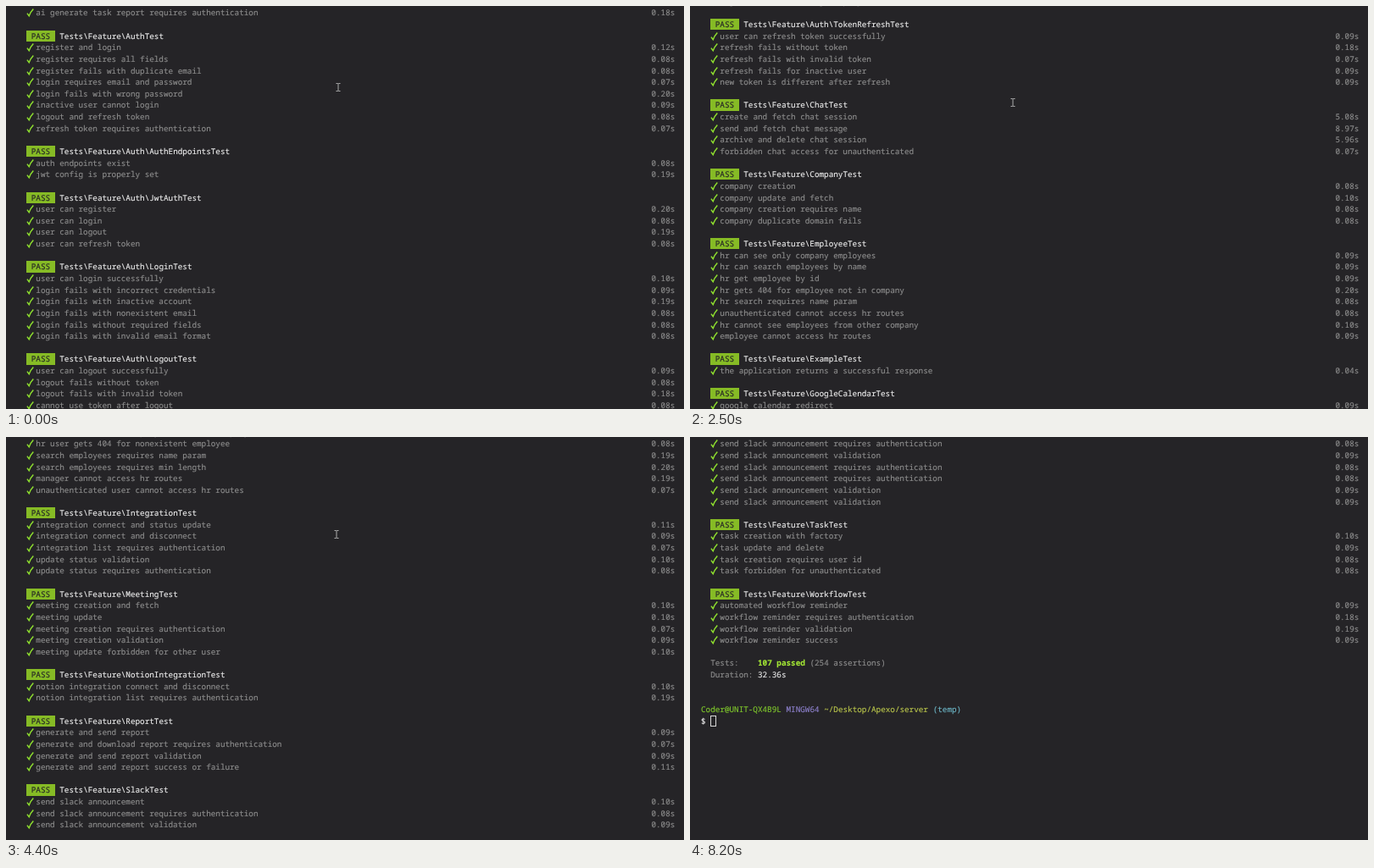
An HTML page for the animation above (8.3 s loop, 800 by 476 pixels).

```html
<!DOCTYPE html>
<html lang="en">
<head>
<meta charset="utf-8">
<title>Test run</title>
<style>
  html, body { margin: 0; width: 100%; height: 100%; overflow: hidden; background: #252427; }
  #term {
    position: relative; width: 800px; height: 476px; overflow: hidden;
    font: 9.3083px/13.635px "Noto Sans Mono", monospace;
    text-rendering: geometricPrecision; font-variant-ligatures: none;
    -webkit-text-stroke: .15px currentColor;
    color: #8c8c8c; white-space: pre;
  }
  .row { position: absolute; left: 13px; width: 776.3px; height: 13.635px; }
  .row span { position: absolute; top: 0; }
  .time { right: 0; }
  .pass { height: 13.2px; background: #86bb25; color: #252427; }
  .check { position: absolute; left: 11px; top: 1px; width: 9px; height: 12px; }
  .check path { fill: none; stroke: #8fe02f; stroke-width: 1.5; }
  .white { color: #ececec; }
  .bold { color: #a3e635; font-weight: 700; }
  .user { color: #7fc62c; }
  .sys { color: #8d80cc; }
  .path { color: #b9c54b; }
  .branch { color: #6cb4c4; }
  .caret { width: 4.4px; height: 11.6px; border: 1px solid #d8d8d8; }
  #mouse { position: absolute; left: 0; top: 0; width: 8px; height: 12px; }
</style>
</head>
<body>
<div id="term"></div>
<script>
const LOOP = 8300, TICK = 100, LINE = 13.635, COL = 5.585, TOP = 1.35;

// "#Name" opens a suite, "0.00 name" is a test, "a" and "v" are repeated redraws
const log = `0.18 ai generate task report requires authentication

#AuthTest
0.12 register and login
0.08 register requires all fields
0.08 register fails with duplicate email
0.07 login requires email and password
0.20 login fails with wrong password
0.09 inactive user cannot login
0.08 logout and refresh token
0.07 refresh token requires authentication

#Auth/AuthEndpointsTest
0.08 auth endpoints exist
0.19 jwt config is properly set

#Auth/JwtAuthTest
0.20 user can register
0.08 user can login
0.19 user can logout
0.08 user can refresh token

#Auth/LoginTest
0.10 user can login successfully
0.09 login fails with incorrect credentials
0.19 login fails with inactive account
0.08 login fails with nonexistent email
0.08 login fails without required fields
0.08 login fails with invalid email format

#Auth/LogoutTest
0.09 user can logout successfully
0.08 logout fails without token
0.18 logout fails with invalid token
0.08 cannot use token after logout

#Auth/RegisterTest
0.09 user can register successfully
0.19 register fails with existing email
0.08 register fails with invalid role
0.07 register fails without required fields
0.18 register fails with password mismatch
0.19 register fails with short password
0.10 can register with optional fields
0.19 register with existing company

#Auth/TokenRefreshTest
0.09 user can refresh token successfully
0.18 refresh fails without token
0.07 refresh fails with invalid token
0.09 refresh fails for inactive user
0.09 new token is different after refresh

#ChatTest
5.08 create and fetch chat session
8.97 send and fetch chat message
5.96 archive and delete chat session
0.07 forbidden chat access for unauthenticated

#CompanyTest
0.08 company creation
0.10 company update and fetch
0.08 company creation requires name
0.08 company duplicate domain fails

#EmployeeTest
0.09 hr can see only company employees
0.09 hr can search employees by name
0.09 hr get employee by id
0.20 hr gets 404 for employee not in company
0.08 hr search requires name param
0.08 unauthenticated cannot access hr routes
0.10 hr cannot see employees from other company
0.09 employee cannot access hr routes

#ExampleTest
0.04 the application returns a successful response

#GoogleCalendarTest
0.09 google calendar redirect
0.08 google calendar event creation requires authentication
0.19 google calendar event creation validation
0.09 google calendar list events requires authentication
0.07 google calendar redirect requires authentication

#HrAccessTest
0.21 hr user can access company employees
0.09 hr user can search employees by name
0.08 non hr user cannot access employee data
0.09 hr user can view single employee in own company
0.09 hr user cannot view employee in other company
0.08 hr user gets 404 for nonexistent employee
0.19 search employees requires name param
0.20 search employees requires min length
0.19 manager cannot access hr routes
0.07 unauthenticated user cannot access hr routes

#IntegrationTest
0.11 integration connect and status update
0.09 integration connect and disconnect
0.07 integration list requires authentication
0.10 update status validation
0.08 update status requires authentication

#MeetingTest
0.10 meeting creation and fetch
0.10 meeting update
0.07 meeting creation requires authentication
0.09 meeting creation validation
0.10 meeting update forbidden for other user

#NotionIntegrationTest
0.10 notion integration connect and disconnect
0.19 notion integration list requires authentication

#ReportTest
0.09 generate and send report
0.07 generate and download report requires authentication
0.09 generate and send report validation
0.11 generate and send report success or failure

#SlackTest
0.10 send slack announcement
${"a\nv\n\n".repeat(8)}#TaskTest
0.10 task creation with factory
0.09 task update and delete
0.08 task creation requires user id
${[..."av-avaavav-"].join("\n")}
#TaskTest
${[..."av-av-avaavv-"].join("\n")}
#TaskTest
0.10 task creation with factory
0.09 task update and delete
0.08 task creation requires user id
0.08 task forbidden for unauthenticated

#WorkflowTest
0.09 automated workflow reminder
0.18 workflow reminder requires authentication
0.19 workflow reminder validation
0.09 workflow reminder success
`;

const repeats = {
  a: "0.08 send slack announcement requires authentication",
  v: "0.09 send slack announcement validation",
  "-": ""
};

const CHECK = `<svg class="check" viewBox="0 0 9 12"><path d="M.9 6.6L3.2 9.7Q5.2 4.8 8.3 1.6"/></svg>`;

const at = (col, text, cls = "") =>
  `<span class="${cls}" style="left:${(col * COL).toFixed(2)}px">${text}</span>`;

function format(raw) {
  const line = repeats[raw] ?? raw;
  if (!line) return "";
  if (line[0] === "#")
    return at(2, " PASS ", "pass") + at(9, "Tests\\Feature\\" + line.slice(1).replace("/", "\\"), "white");
  return CHECK + at(4, line.slice(5)) + `<span class="time">${line.slice(0, 4)}s</span>`;
}

const lines = log.split("\n").map(format);
lines.push(
  at(2, "Tests:") + at(12, "107 passed", "bold") + at(23, "(254 assertions)"),
  at(2, "Duration:") + at(12, "32.36s", "white"),
  "", "",
  at(0, "Coder@UNIT-QX4B9L", "user") + at(18, "MINGW64", "sys") +
    at(26, "~/Desktop/Apexo/server", "path") + at(49, "(temp)", "branch"),
  at(0, "$", "white") + at(2, "", "caret")
);

// [time, first line]
const scroll = [
  [0, 0], [900, 15], [1200, 15], [1600, 25], [2500, 45], [3000, 61], [3200, 61],
  [3300, 65], [3500, 71], [3600, 71], [4400, 91], [4500, 94], [4600, 94],
  [6100, 133], [6200, 133], [6400, 138], [7100, 169], [LOOP, 169]
];
// [time, x, y]
const pointer = [
  [0, 392, 96], [1600, 389, 109], [2500, 381, 114], [3300, 371, 120],
  [4400, 390, 115], [6400, 398, 111], [LOOP, 398, 111]
];
const POINTER_END = 7200;

function sample(keys, t, field) {
  const i = keys.findIndex(k => k[0] > t);
  const a = keys[i - 1], b = keys[i];
  return a[field] + (b[field] - a[field]) * (t - a[0]) / (b[0] - a[0]);
}

const term = document.getElementById("term");
const rows = [];
for (let i = -1; i < 35; i++) {
  const row = document.createElement("div");
  row.className = "row";
  row.style.top = (TOP + i * LINE).toFixed(2) + "px";
  term.append(row);
  rows.push(row);
}
term.insertAdjacentHTML("beforeend",
  `<svg id="mouse" viewBox="0 0 8 12"><path d="M1.5 1.5H3.5L4 2L4.5 1.5H6.5M4 2V10M1.5 10.5H3.5L4 10L4.5 10.5H6.5" fill="none" stroke="#adadad"/></svg>`);
const mouse = document.getElementById("mouse");

let shown = -1;
function draw(now) {
  const t = Math.floor((now % LOOP) / TICK) * TICK;
  const first = Math.round(sample(scroll, t, 1));
  if (first !== shown) {
    rows.forEach((row, i) => { row.innerHTML = lines[first + i - 1] ?? ""; });
    shown = first;
  }
  const x = Math.round(sample(pointer, t, 1)) - 4;
  const y = Math.round(sample(pointer, t, 2)) - 6;
  mouse.style.transform = `translate(${x}px, ${y}px)`;
  mouse.style.visibility = t < POINTER_END ? "visible" : "hidden";
}
function loop() {
  draw(performance.now());
  requestAnimationFrame(loop);
}
loop();
</script>
</body>
</html>
```
